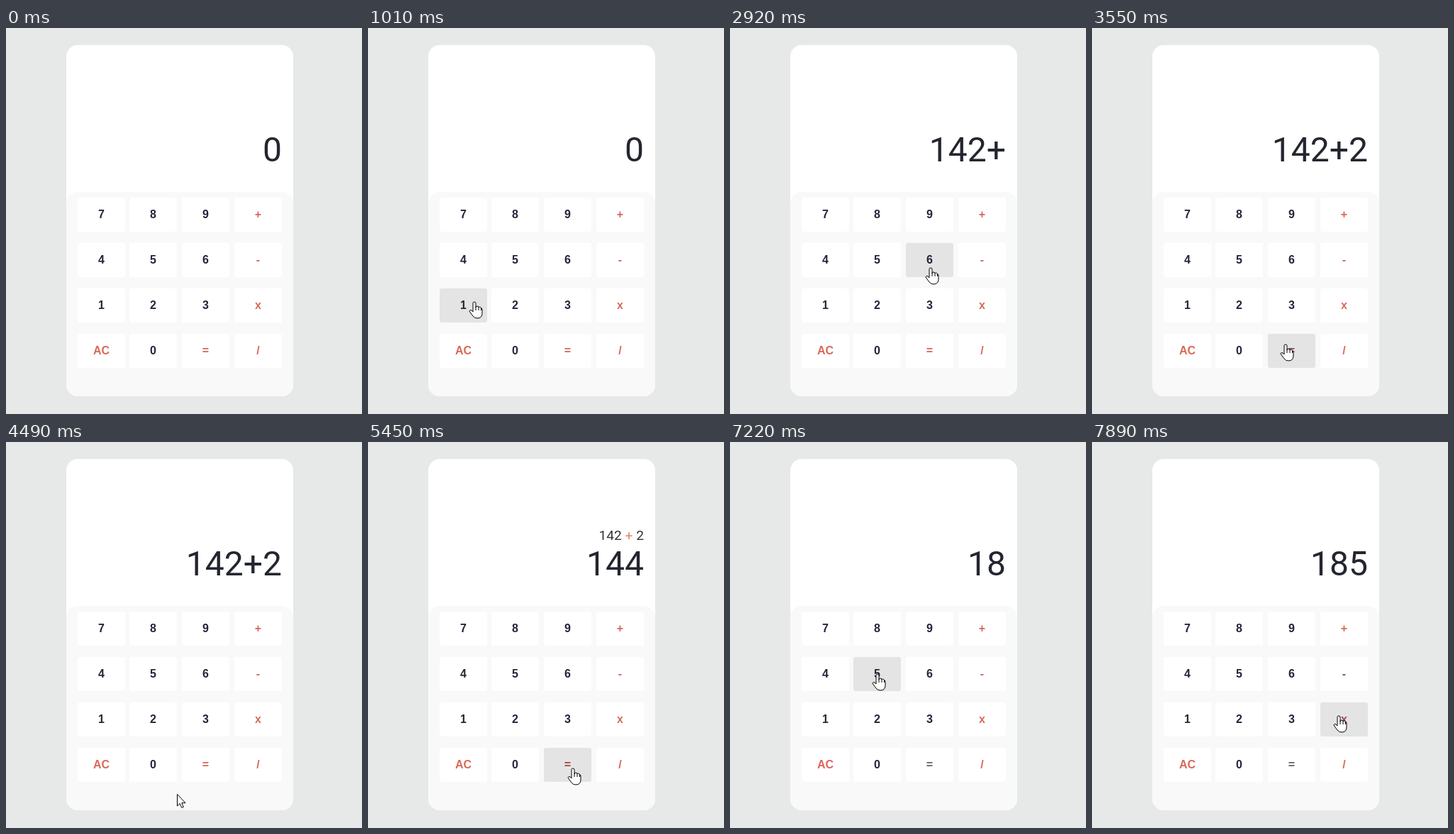
Animation, 502 px wide and 544 px high, one loop 8 s. Source, as an HTML page:

```html
<!DOCTYPE html>
<html lang="en">
<head>
<meta charset="utf-8">
<title>Calculator</title>
<style>
  html, body { margin: 0; width: 100%; height: 100%; overflow: hidden; background: #e6e9e8; }
  svg { display: block; }
  text { fill: #23263a; white-space: pre; text-anchor: end; }
  .key { font: 700 16px "Liberation Sans", Arial, sans-serif; text-anchor: middle; }
  .op { fill: #d9695a; }
  .op.left { fill: #666; }
  .op.hover { fill: #a8484d; }
  .total { font: 48px Roboto, sans-serif; fill: #23262f; }
  .history { font: 19.2px Roboto, sans-serif; fill: #333; }
  .history tspan { fill: #e08a68; }
  .cursor path { fill: #fff; stroke: #000; stroke-linejoin: round; }
  .cursor .crease { fill: none; }
</style>
</head>
<body>
<svg width="502" height="544" viewBox="0 0 502 544">
  <rect x="85" y="24" width="320" height="495" rx="16" fill="#fff"/>
  <rect x="85" y="231" width="320" height="288" rx="16" fill="#f9f9f9"/>
  <text class="history" id="history" x="389" y="138"><tspan></tspan></text>
  <text class="total" id="total" x="389" y="188"></text>
  <g id="keys"></g>
  <g class="cursor" id="cursor">
    <path id="arrow" d="M.5 .5V17L4.2 13.5L6.8 19.5L9.3 18.4L6.8 12.6H12Z"/>
    <g id="hand">
      <path d="M-2 14V1.5Q-2 0 0 0T2 2V8Q2 6 4 6T6 8Q6 7 7.5 7T9.5 9Q11 8.5 11 11V16Q11 23 4 23Q0 23-2 20L-6.5 14Q-7.5 12-6 11.5Q-4 11-2 14Z"/>
      <path class="crease" d="M2 7.5V12M6 8V12M9.5 9V12"/>
    </g>
  </g>
</svg>
<script>
const LOOP = 8000;
const PRESS_DELAY = 180;
const DWELL = 200;
const HOVER_LAG = 25;
const $ = id => document.getElementById(id);

function add(tag, attrs, label = '') {
  const el = document.createElementNS('http://www.w3.org/2000/svg', tag);
  for (const name in attrs) el.setAttribute(name, attrs[name]);
  el.textContent = label;
  return $('keys').appendChild(el);
}

const keys = [...'789+456-123x', 'AC', ...'0=/'].map((label, i) => {
  const x = Math.floor(101 + 73.75 * (i % 4)), y = 239 + 64 * Math.floor(i / 4);
  const w = 67, h = 48, cx = x + w / 2, cy = y + h / 2;
  const rect = add('rect', { x, y, width: w, height: h, rx: 3 });
  const text = add('text', { class: 'key', x: cx, y: y + 29 }, label);
  text.classList.toggle('op', isNaN(label));
  const contains = p => p && Math.abs(p.x - cx) <= w / 2 && Math.abs(p.y - cy) <= h / 2;
  return { label, rect, text, cx, cy, contains, leftAt: Infinity };
});

// The pointer's route, and the screens that its presses produce
const stops = [];
const screens = [{ at: 0, total: '0', sum: null }];
let fresh = true;

function moveTo(label, at, dx = 0, dy = 0, dwell = 0) {
  const key = keys.find(k => k.label === label);
  key.leftAt = at + dwell;
  stops.push({ at, leave: at + dwell, x: key.cx + dx, y: key.cy + dy });
}

function press(label, at, dx, dy) {
  moveTo(label, at, dx, dy, DWELL);
  const { total } = screens[screens.length - 1];
  const equals = label === '=';
  const sum = equals ? total.split('+') : null;
  const next = equals ? String(+sum[0] + +sum[1]) : (fresh ? '' : total) + label;
  screens.push({ at: at + PRESS_DELAY, total: next, sum });
  fresh = equals;
}

moveTo('0', 130, 58, 42);
moveTo('0', 730, 8);
press('1', 990, 15, -5);
press('4', 1520, 12);
press('2', 2028, 15, -3);
press('+', 2548, -7, 21);
press('2', 3085, 15, -3);
moveTo('=', 3605, -5, -4, 415);
moveTo('0', 4500, 33, 41);
press('=', 5020, 7, 5);
moveTo('=', 5720, 7, 5);
press('1', 6220, 8, -5);
press('8', 6816);
press('5', 7220);
moveTo('-', 7650, 25, 5);
moveTo('x', 7890, -8, -5);

const latest = (list, t) => list.filter(item => item.at <= t).pop();

function pointerAt(t) {
  const from = latest(stops, t);
  const to = stops[stops.indexOf(from) + 1];
  if (!from || !to || t < from.leave) return from;
  const u = (t - from.leave) / (to.at - from.leave), e = u * u * (3 - 2 * u);
  return { x: from.x + (to.x - from.x) * e, y: from.y + (to.y - from.y) * e };
}

const show = (id, on) => $(id).style.display = on ? '' : 'none';

function render(t) {
  const p = pointerAt(t), before = pointerAt(t - HOVER_LAG);
  for (const key of keys) {
    const hover = !!key.contains(before);
    key.rect.setAttribute('fill', hover ? '#e4e4e4' : '#fff');
    key.text.classList.toggle('hover', hover);
    key.text.classList.toggle('left', t > key.leftAt && key.label !== '+');
  }

  const { total, sum } = latest(screens, t);
  $('total').textContent = total;
  $('history').innerHTML = sum ? sum.join(' <tspan>+</tspan> ') : '';

  show('cursor', p);
  if (!p) return;
  const over = keys.some(key => key.contains(p));
  show('hand', over);
  show('arrow', !over);
  $('cursor').setAttribute('transform', `translate(${Math.round(p.x + .5)} ${Math.round(p.y)})`);
}

const start = performance.now();
function tick() {
  render((performance.now() - start) % LOOP);
  requestAnimationFrame(tick);
}
tick();
</script>
</body>
</html>
```
